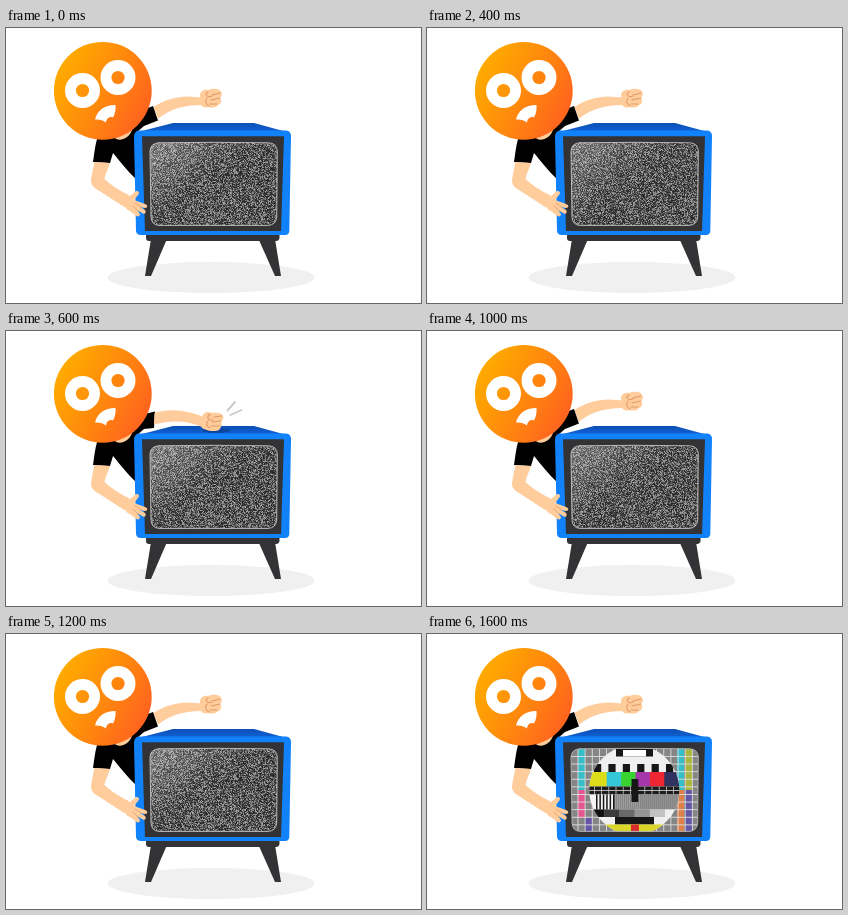
Recreate the animation shown at these times as an HTML page with a canvas. Size 415 px wide and 275 px high, loop 2.6 s.

```html
<!DOCTYPE html>
<html lang="en">
<head>
<meta charset="utf-8">
<title>TV repair</title>
<style>
  html, body { margin: 0; width: 100%; height: 100%; overflow: hidden; background: #fff; }
  canvas { display: block; width: 415px; height: 275px; }
</style>
</head>
<body>
<canvas id="stage"></canvas>
<script>
const W = 415, H = 275, LOOP = 2600;
const SKIN = '#ffcc9c', CREASE = '#e29a68', DARK = '#333335';

// Poses in order: start time, static grain (-1 = test card), arm down, eyes shut
const STEPS = [
  { at: 0, grain: 0 },
  { at: 200, grain: 1, blink: true },
  { at: 400, grain: 2 },
  { at: 600, grain: 0, hit: true },
  { at: 800, grain: 1 },
  { at: 1000, grain: 2 },
  { at: 1200, grain: 0 },
  { at: 1400, grain: 1, hit: true },
  { at: 1600, grain: -1 }
];

const stage = document.getElementById('stage');
const dpr = window.devicePixelRatio || 1;
stage.width = W * dpr;
stage.height = H * dpr;
const ctx = stage.getContext('2d');
ctx.scale(dpr, dpr);

function fill(d, color) {
  ctx.fillStyle = color;
  ctx.fill(new Path2D(d));
}
function line(d, color, width) {
  ctx.strokeStyle = color;
  ctx.lineWidth = width;
  ctx.lineCap = ctx.lineJoin = 'round';
  ctx.stroke(new Path2D(d));
}
function rect(x, y, w, h, color) {
  ctx.fillStyle = color;
  ctx.fillRect(x, y, w, h);
}
function ellipse(x, y, rx, ry, color) {
  ctx.fillStyle = color;
  ctx.beginPath();
  ctx.ellipse(x, y, rx, ry, 0, 0, Math.PI * 2);
  ctx.fill();
}
function gradient(x0, y0, x1, y1, ...colors) {
  const g = ctx.createLinearGradient(x0, y0, x1, y1);
  colors.forEach((c, i) => g.addColorStop(i / (colors.length - 1), c));
  return g;
}

function makeGrain(seed) {
  const c = document.createElement('canvas');
  c.width = 128;
  c.height = 84;
  const g = c.getContext('2d');
  const img = g.createImageData(c.width, c.height);
  let s = seed;
  for (let i = 0; i < img.data.length; i += 4) {
    s = (Math.imul(s, 1664525) + 1013904223) >>> 0;
    const v = 36 + 135 * Math.pow(s / 4294967296, 1.5);
    img.data[i] = img.data[i + 1] = img.data[i + 2] = v;
    img.data[i + 3] = 255;
  }
  g.putImageData(img, 0, 0);
  return c;
}
const grains = [11, 4207, 90533].map(makeGrain);

function drawTorso(hit) {
  const cuff = hit ? 'L148 97 L149 80.5' : 'L152 92.5 L147 78';
  fill('M91 111 C89 118 88 127 87 134 L104 135 L107 125 C113 132 121 143 131 152 L131 104 L138 98 ' +
    cuff + ' L126 86 L100 105Z', '#000');
  fill('M107 108 C111 114.5 122 112.5 126 102 L115 96Z', SKIN);
}

function drawHead(blink) {
  const skin = gradient(55, 40, 139, 86, '#ffaa00', '#ff8a0c', '#ff641e');
  ellipse(96.8, 62.8, 48.9, 48.9, skin);
  for (const [x, y] of [[76.5, 62.5], [112, 49.5]]) {
    if (blink) {
      line(`M${x - 13} ${y + 5} L${x + 13} ${y - 5}`, '#fff', 5);
    } else {
      ellipse(x, y, 17.5, 17.5, '#fff');
      ellipse(x, y, 6.6, 6.6, skin);
    }
  }
  fill('M89 91.5 C91 83 98 77 109.5 77 C110 81 109 86 107 89.5 C103 88 100.5 91 100 94.5 C97 92 93 91 89 91.5Z', '#fff');
}

function drawRaisedArm() {
  fill('M147.5 79 C158 72 170 68.5 182 68.5 L196 69.5 L196 77 C178 77.5 166 80 152 90.5Z', SKIN);
  fill('M194 68 C194 63 198 61 202 62 C207 60 214 60 215 64 C217 67 215 69 214 70 C217 73 214 77 212 77 C210 80 205 80 202 79 C198 81 194 77 194 74Z', SKIN);
  line('M202 64 C198 66 201 70 206 68 M206 67 L214 65 M205 72 L214 70 M204 76 L211 76 M201 70 C198 74 201 77 203 78', CREASE, 1.1);
}

function drawStrikingArm() {
  fill('M148.5 82 C161 78 176 78 198 86 L197 96.5 C182 89.5 166 89 148 93.5Z', SKIN);
  fill('M196 86 C197 81 202 80 206 82 C210 81 216 82 217 85 C218 88 216 90 215 91 C217 94 214 98 213 99 C209 101 202 100 198 98 C194 97 195 91 196 86Z', SKIN);
  line('M204 83 C200 86 202 90 207 89 M208 86 L216 85 M206 91 L215 90 M205 95 L214 95 M202 90 C199 93 201 96 204 97', CREASE, 1.1);
  line('M221.5 79.5 L229 71 M224.5 84 L235.5 79', '#c9c9c9', 1.9);
}

function drawHoldingArm() {
  fill('M88.5 134 C87 141 85.5 147 85 153 C85 157 88 160 92 162 L119 179.5 L123 167 C114 163 105 157 98.5 151 C99 147 102 141 104 135Z', SKIN);
  fill('M118 171 C122 169 127 166 130 163 C133 163 134 165 132 167 L128 172 L139 176 C142 177 142 180 139 180 L134 179 L139 182 C141 185 138 187 136 185 L131 182 L134 186 C134 189 131 189 129 187 L124 183 C120 182 118 178 118 171Z', SKIN);
  line('M129 175 L135 179 M127 178 L132 183', CREASE, 0.8);
}

function drawTv(hit) {
  ellipse(205, 249.5, 103.5, 15.5, '#f0f0f0');
  fill('M145 211 L161 211 L145 248 L139 248Z M252.5 211 L269 211 L275 248 L269 248Z', DARK);
  fill('M140 206 H273.5 V210 Q273 213 270 213 H143 Q140 213 140 210Z', DARK);
  fill('M132 104 L167 95 H248 L281 104Z', gradient(0, 95, 0, 104, '#0b4fb5', '#1262d6'));
  if (hit) ellipse(210, 99.5, 14, 2.5, '#0b479f');
  fill('M133 102.5 H280 Q285.5 103 285 109 L283.3 203 Q283 207 279 207 H135 Q130.5 207 130 203 L128 109 Q128 103 133 102.5Z', '#1282fa');
  fill('M136 108.3 H278 L275 203 H139Z', DARK);
}

function drawCard() {
  rect(143, 114, 130, 85, '#858585');
  // side colour blocks
  rect(151, 114, 7, 42, '#36bfc8');
  rect(151, 156, 7, 28, '#e45591');
  rect(158, 184, 7, 15, '#6656a8');
  rect(250, 114, 7, 42, '#36bfc8');
  rect(258, 114, 7, 42, '#a9b73d');
  rect(250, 156, 7, 43, '#df8048');
  rect(258, 156, 7, 43, '#6656a8');
  for (let x = 150.5; x < 273; x += 7.15) rect(x, 114, 0.9, 85, '#dedede');
  for (let y = 122; y < 199; y += 7.6) rect(143, y, 130, 0.9, '#dedede');

  ctx.save();
  ctx.beginPath();
  ctx.arc(207.3, 156, 45, 0, Math.PI * 2);
  ctx.clip();
  rect(162, 111, 91, 90, '#efefef');
  rect(189, 114, 37, 8.5, '#171717');
  rect(196, 116, 23, 6.5, '#fff');
  for (let x = 167; x < 252; x += 14.4) rect(x, 130, 7.2, 8, '#171717');
  ['#dddc18', '#36c6da', '#39d332', '#a438aa', '#ee2634', '#30335f'].forEach((c, i) =>
    rect(i ? 165.3 + i * 14.4 : 162, 138, 18, 14.5, c));
  rect(162, 152.5, 91, 8, '#1d1d1d');
  for (let x = 167; x < 252; x += 7.2) rect(x, 152.5, 0.8, 8, '#c9c9c9');
  rect(162, 156, 91, 0.9, '#c9c9c9');
  rect(162, 160.5, 91, 15, '#858585');
  rect(162, 160.5, 25, 15, '#f4f4f4');
  for (let x = 169; x < 187; x += 3.4) rect(x, 160.5, 1.5, 15, '#171717');
  for (let x = 188; x < 252; x += 2) rect(x, 160.5, 0.8, 15, x < 214 ? '#a4a4a4' : '#949494');
  ['#111', '#3b3b3b', '#686868', '#949494', '#c2c2c2', '#efefef'].forEach((c, i) =>
    rect(162 + i * 15.2, 175.5, 15.5, 7.5, c));
  rect(188, 183, 39, 7.5, '#171717');
  rect(162, 190.5, 91, 9, '#d9d629');
  rect(204, 190.5, 8, 9, '#d92d2d');
  rect(204.5, 145, 6.8, 23, '#171717');
  ctx.restore();
}

function drawScreen(grain) {
  const glass = 'M153 114.8 Q207 113.8 262 114.8 Q271 115 271.3 123 L270.7 189 Q270 197 262 197.4 H153 Q145.5 197 145 189 L144 123 Q144.5 115 153 114.8Z';
  ctx.save();
  ctx.clip(new Path2D(glass));
  if (grain < 0) {
    drawCard();
  } else {
    ctx.drawImage(grains[grain], 144, 114);
    // glass sheen from the upper left
    rect(143, 114, 130, 85, gradient(144, 114, 185, 165, '#ffffff48', '#ffffff00'));
  }
  ctx.restore();
  line(glass, grain < 0 ? '#b5b5b5' : '#c4c4c4', 0.9);
}

function draw({ grain, hit, blink }) {
  rect(0, 0, W, H, '#fff');
  if (!hit) drawRaisedArm();
  drawTorso(hit);
  drawTv(hit);
  drawHead(blink);
  drawScreen(grain);
  if (hit) drawStrikingArm();
  drawHoldingArm();
}

const start = performance.now();
let shown = null;
function tick() {
  const t = (performance.now() - start) % LOOP;
  const step = STEPS.filter(s => s.at <= t).pop();
  if (step !== shown) draw(shown = step);
  requestAnimationFrame(tick);
}
tick();
</script>
</body>
</html>
```
